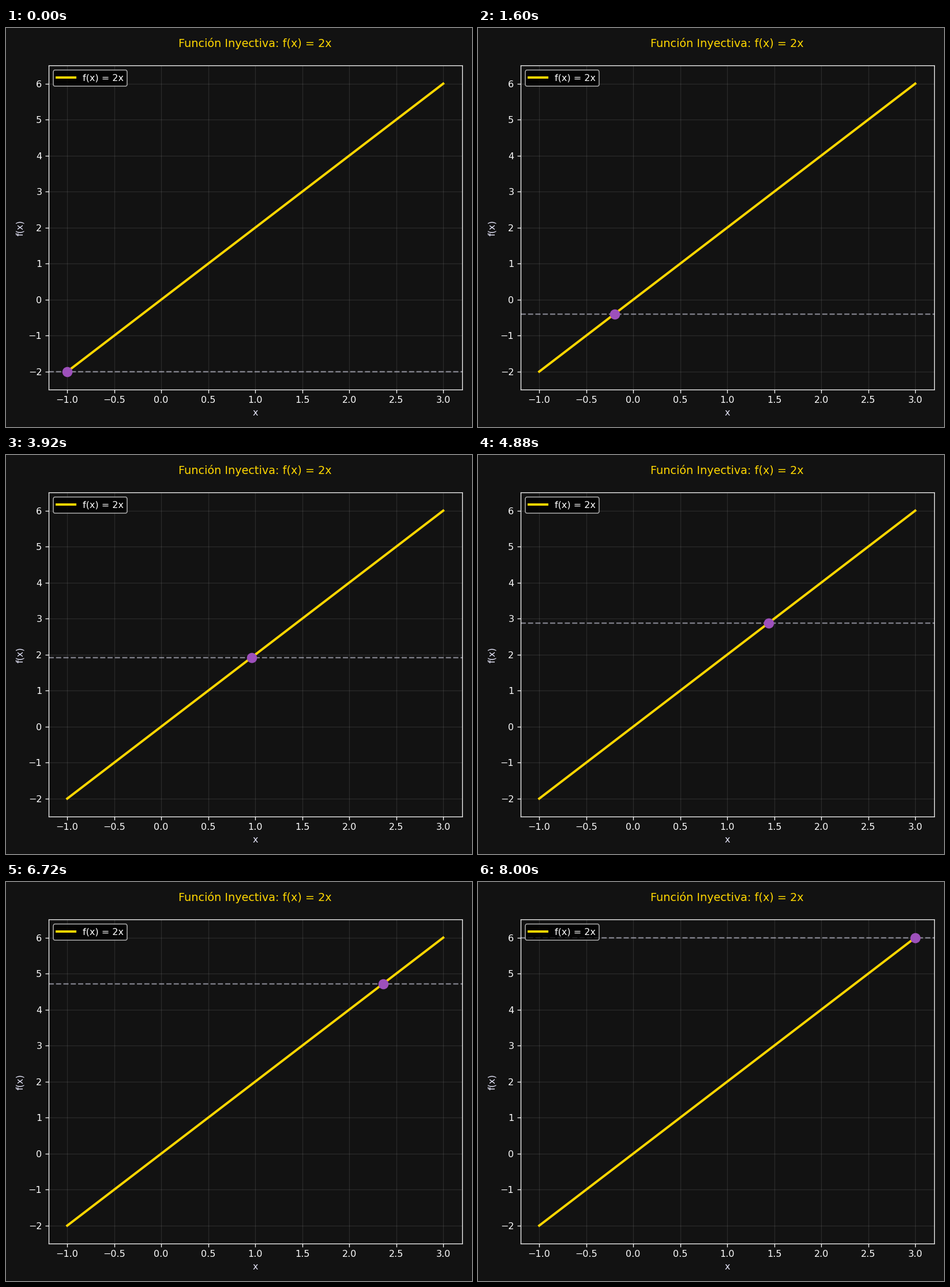
Animation of 808x693 px, one loop 9.6 s. Source, as a matplotlib script:

```python
import matplotlib.pyplot as plt
import numpy as np
from matplotlib.animation import FuncAnimation

WIDTH, HEIGHT, DPI = 808, 693, 115.5
FRAMES, INTERVAL = 120, 80
SWEEP_STEPS = 100  # the remaining frames hold the end pose
BACKGROUND, GOLD, PURPLE, LAVENDER = "#121212", "#FFD700", "#9D50BB", "#E6E6FA"

plt.style.use("dark_background")
plt.rcParams["font.family"] = "DejaVu Sans"


def f(x):
    return 2 * x


# The tiny margin keeps the pixel size from truncating downwards.
fig, ax = plt.subplots(
    figsize=((WIDTH + 1e-3) / DPI, (HEIGHT + 1e-3) / DPI), dpi=DPI)
fig.set_facecolor(BACKGROUND)
ax.set_facecolor(BACKGROUND)

xs = np.linspace(-1, 3, 200)
ax.plot(xs, f(xs), color=GOLD, lw=2.5, label="f(x) = 2x")
level = ax.axhline(f(-1), color=LAVENDER, ls="--", lw=1.5, alpha=0.5)
point, = ax.plot([-1], [f(-1)], "o", color=PURPLE, markersize=10)

ax.set_xlim(-1.2, 3.2)
ax.set_ylim(-2.5, 6.5)
ax.set_title("Función Inyectiva: f(x) = 2x", color=GOLD, fontsize=12, pad=20)
ax.set_xlabel("x", color=LAVENDER)
ax.set_ylabel("f(x)", color=LAVENDER)
ax.grid(color="white", alpha=0.1)
ax.legend(loc="upper left")
fig.tight_layout()


def update(frame):
    x = -1 + 4 * min(frame, SWEEP_STEPS) / SWEEP_STEPS
    point.set_data([x], [f(x)])
    level.set_ydata([f(x), f(x)])
    return point, level


animation = FuncAnimation(fig, update, frames=FRAMES, interval=INTERVAL,
                          repeat=True, repeat_delay=0, blit=False)
plt.show()
```
